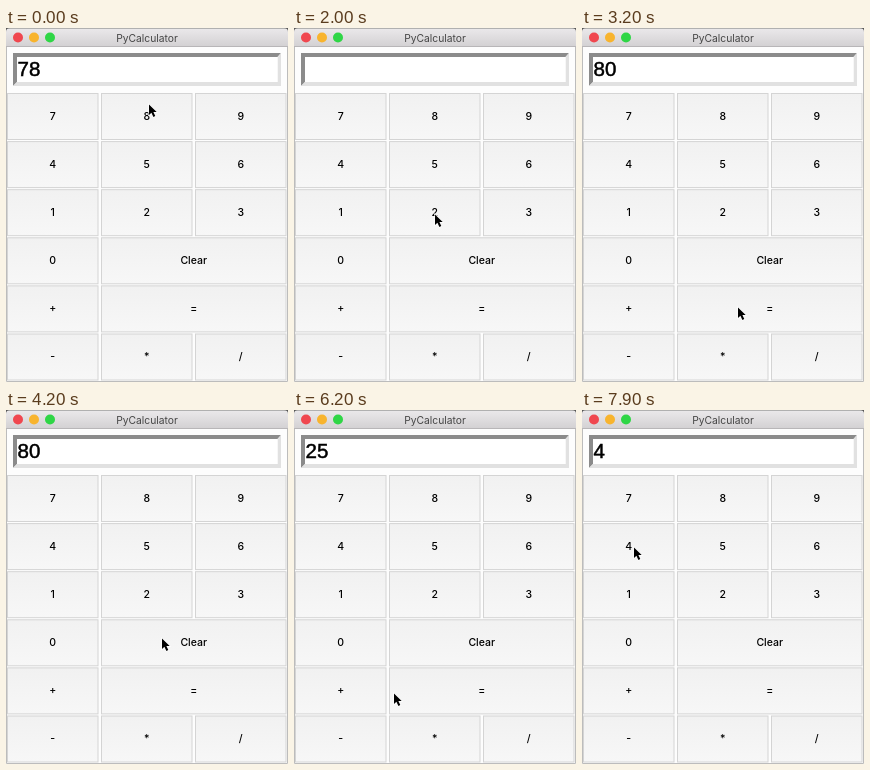
Recreate the animation shown at these times as an HTML page. Size 282 by 354 pixels, loop 8000 ms.

```html
<!DOCTYPE html>
<html lang="en">
<head>
<meta charset="utf-8">
<title>PyCalculator</title>
<style>
html, body { margin: 0; width: 100%; height: 100%; overflow: hidden; background: #fff; }
svg { display: block; width: 282px; height: 354px; }
text { font: 500 10.5px Inter, "Liberation Sans", sans-serif; text-anchor: middle; }
#title { font-weight: 400; font-size: 10.3px; fill: #464646; }
#display { font: 20.5px "Liberation Sans", Arial, sans-serif; text-anchor: start; stroke: #000; stroke-width: .5px; }
</style>
</head>
<body>
<svg viewBox="0 0 282 354">
  <defs>
    <linearGradient id="bar" x2="0" y2="1">
      <stop stop-color="#ebe9eb"/><stop offset="1" stop-color="#d2d0d2"/>
    </linearGradient>
    <linearGradient id="face" x2="0" y2="1">
      <stop stop-color="#f1f1f1"/><stop offset="1" stop-color="#f7f7f7"/>
    </linearGradient>
  </defs>
  <rect width="282" height="354" fill="#fdfdfd"/>
  <rect width="282" height="19" fill="url(#bar)"/>
  <path d="M0 18.5H282" stroke="#b8b6b8"/>
  <path d="M.5 19V353.5H281.5V19" fill="none" stroke="#bcbcbc"/>
  <path d="M0 .5H282" stroke="#b0b0b0"/>
  <path d="M0 0H4Q0 0 0 4ZM282 0H278Q282 0 282 4Z" fill="#555"/>
  <circle cx="12" cy="9.5" r="5" fill="#f0474f"/>
  <circle cx="28" cy="9.5" r="5" fill="#f8b42e"/>
  <circle cx="44" cy="9.5" r="5" fill="#2fd646"/>
  <text id="title" x="141" y="13.5">PyCalculator</text>
  <path d="M7 58V25H275L271.5 29H11V54Z" fill="#8b8b8b"/>
  <path d="M7 58H275V25L271.5 29V54H11Z" fill="#e1e1e1"/>
  <rect x="11" y="29" width="260.5" height="25" fill="#fff"/>
  <text id="display" x="11.6" y="48.4"></text>
  <g id="keys"></g>
  <path id="cursor" d="M1 1.5v10.6l2.4-2.3l2 4.2l1.9-.9l-1.9-4h3.3Z" stroke="#fff" stroke-width="1.2" paint-order="stroke"/>
</svg>
<script>
const LOOP = 8000, STEP = 100;
const $ = id => document.getElementById(id);

const rows = ['7 8 9', '4 5 6', '1 2 3', '0 Clear', '+ =', '- * /'];
const keyX = col => 1.5 + col * 94;
$('keys').innerHTML = rows.map((row, r) => row.split(' ').map((label, c, all) => {
  const x = keyX(c), y = 65.5 + r * 48.1;
  const last = c === all.length - 1;
  const w = (last ? 280 : keyX(c + 1) - 3.5) - x;
  return `<rect x="${x}" y="${y}" width="${w}" height="46" fill="url(#face)" stroke="#d4d4d4"/>
    <text x="${x + w / 2}" y="${y + 26.3}">${label}</text>`;
}).join('')).join('');

// Pointer strokes: leave, arrive, x, y, then the press time and the text it shows
const strokes = [
  [0, 0, 142, 75, 0, '78'],
  [400, 1000, 79, 266],
  [1000, 1300, 67, 287, 1600, ''],
  [1700, 2000, 140, 185, 2400, '2'],
  [2500, 2900, 155, 278, 3200, '80'],
  [3700, 3900, 155, 227, 4400, ''],
  [4600, 4900, 146, 188, 5200, '2'],
  [5200, 5900, 137, 137, 6000, '25'],
  [6000, 6200, 99, 282],
  [6200, 6700, 47, 324, 6900, ''],
  [6900, 7700, 51, 136, 7800, '4']
];

function draw(now) {
  const t = Math.floor(now % LOOP / STEP) * STEP;
  let px = 0, py = 0, shown = '';
  for (const [leave, arrive, x, y, press, text] of strokes) {
    const k = t >= arrive ? 1 : Math.max(0, (t - leave) / (arrive - leave));
    px += (x - px) * k;
    py += (y - py) * k;
    if (t >= press) shown = text;
  }
  $('display').textContent = shown;
  $('cursor').setAttribute('transform', `translate(${px} ${py})`);
}

const start = performance.now();
function tick() {
  draw(performance.now() - start);
  requestAnimationFrame(tick);
}
tick();
</script>
</body>
</html>
```
